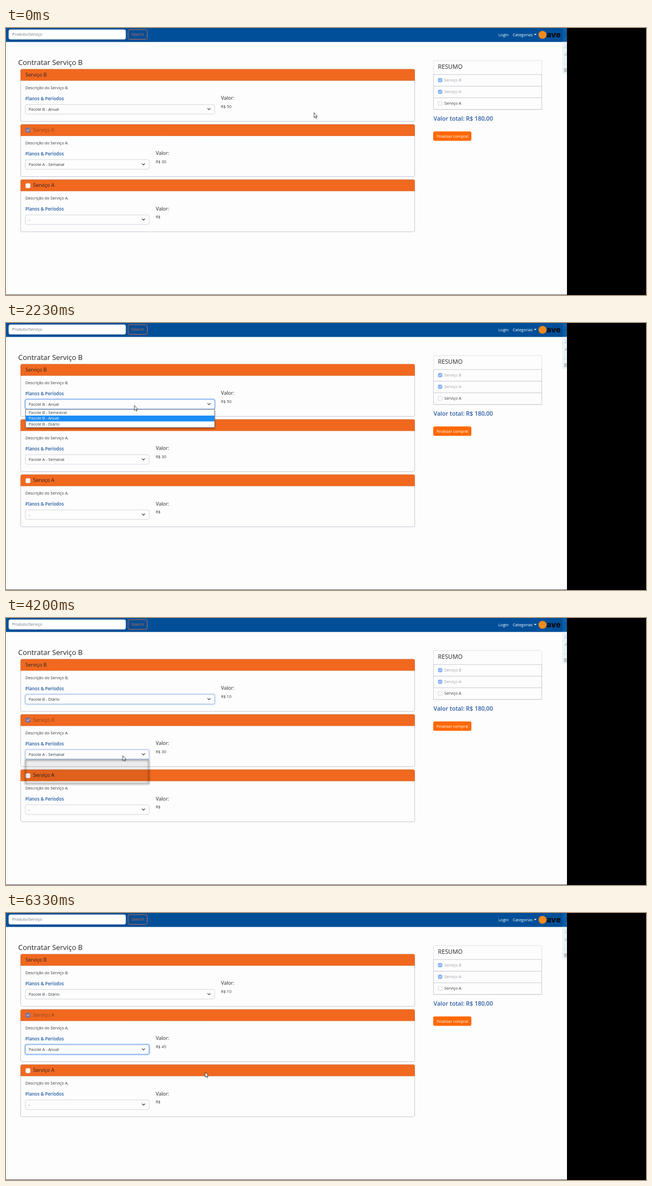
Write an HTML page that moves like this. It is 1158x484 px and loops after 6360 ms.

```html
<!DOCTYPE html>
<html lang="pt-BR">
<head>
<meta charset="utf-8">
<title>Contratar Serviço</title>
<style>
html, body { margin: 0; width: 100%; height: 100%; overflow: hidden; background: #000; }
svg { display: block; width: 1158px; height: 484px; }
text { font: 7.25px "Open Sans", "Noto Sans", sans-serif; fill: #33373c; white-space: pre; }
.title { font-size: 13px; font-weight: 500; fill: #212529; }
.head { font-size: 9.1px; font-weight: 500; fill: #212529; }
.plan { font-size: 8px; font-weight: 600; fill: #1f5a9f; }
.sum { font-size: 10.8px; font-weight: 500; fill: #212529; }
.total { font-size: 10.6px; font-weight: 600; fill: #2a5ca6; }
.muted { fill: #9b9fa4; }
.white { fill: #fff; }
.brand { font: 800 14.5px Inter, sans-serif; fill: #0b0b10; }
</style>
</head>
<body>
<svg id="stage" viewBox="0 0 1158 484"></svg>
<script>
const LOOP = 6360;
const ORANGE = '#f1681f';
const css = [];
const pct = t => (t / LOOP * 100).toFixed(3) + '%';

// Registers keyframes and returns the matching style attribute.
function anim(frames, easing) {
  const name = 'k' + css.length;
  css.push(`@keyframes ${name}{${frames}}`);
  return `style="animation:${name} ${LOOP}ms ${easing} infinite"`;
}

// Visible only inside the given [start, end] spans.
function during(...spans) {
  let frames = spans[0][0] > 0 ? '0%{opacity:0}' : '';
  for (const [a, b] of spans) {
    frames += `${pct(a)}{opacity:1}`;
    if (b < LOOP) frames += `${pct(b)}{opacity:0}`;
  }
  const last = spans[spans.length - 1][1] < LOOP ? 0 : 1;
  return anim(frames + `100%{opacity:${last}}`, 'step-end');
}

function fade(on, off) {
  const end = off ? `${pct(off)}{opacity:1}${pct(off + 150)},100%{opacity:0}` : '100%{opacity:1}';
  return anim(`0%,${pct(on)}{opacity:0}${pct(on + 150)}{opacity:1}${end}`, 'ease-in-out');
}

const text = (x, y, s, cls = '', extra = '') => `<text x="${x}" y="${y}" class="${cls}" ${extra}>${s}</text>`;
const rect = (x, y, w, h, fill, extra = '') =>
  `<rect x="${x}" y="${y}" width="${w}" height="${h}" fill="${fill}" ${extra}/>`;
const path = (d, stroke, width = 1) =>
  `<path d="${d}" fill="none" stroke="${stroke}" stroke-width="${width}" stroke-linecap="round" stroke-linejoin="round"/>`;
const swap = (x, y, before, after, t) =>
  text(x, y, before, '', during([0, t])) + text(x, y, after, '', during([t, LOOP]));

function checkbox(x, y, size, fill, border, checked) {
  const u = size / 8;
  return rect(x, y, size, size, fill, `rx="1.8" stroke="${border}" stroke-width=".8"`) +
    (checked ? path(`M${x + 2 * u} ${y + 4.1 * u}l${1.5 * u} ${1.5 * u} ${2.7 * u} ${-3 * u}`, '#fff') : '');
}

function card({ i, name, box, width, valueX, plan, price, ring, at }) {
  const y = 75 + i * 100.1;
  const titleX = i ? 49 : 35;
  const arrow = 35 + width - 12.6;
  const label = (x, dy, v) => at ? swap(x, y + dy, v[0], v[1], at) : text(x, y + dy, v);
  return rect(26.5, y - .2, 713, 94.5, '#fdfdfd', 'rx="2.5" stroke="#c6c8d4"') +
    `<path d="M26.5 ${y + 20.3}v-18q0-2.5 2.5-2.5h708q2.5 0 2.5 2.5v18z" fill="${ORANGE}" stroke="#d66a33" stroke-width=".6"/>` +
    (box || '') +
    text(titleX, y + 12.8, name, 'head', i === 1 ? 'fill-opacity=".5"' : '') +
    text(35, y + 35.8, `Descrição do ${name}.`) +
    text(35, y + 55.8, 'Planos &amp; Períodos', 'plan') +
    text(valueX, y + 55.3, 'Valor:', 'head') +
    label(valueX, 70, price) +
    rect(35, y + 63.6, width, 17.4, '#fdfdfd', 'rx="3" stroke="#ced2da" stroke-width=".9"') +
    (ring ? `<g ${ring}>` +
      rect(34.2, y + 62.8, width + 1.6, 19, 'none', 'rx="3.6" stroke="#0d6efd" stroke-opacity=".27" stroke-width="2.4"') +
      rect(35, y + 63.6, width, 17.4, 'none', 'rx="3" stroke="#80aeea" stroke-width=".9"') + '</g>' : '') +
    label(41, 74.8, plan) +
    path(`M${arrow} ${y + 70.8}l2.4 2.4 2.4-2.4`, '#343a40', 1.1);
}

function popup({ y, width, open, close, items, marks }) {
  const step = 10.6;
  const h = items.length * step + .8;
  const rows = items.map((s, i) => {
    const base = y + 8 + i * step;
    const on = marks[i] ? `<g ${during(...marks[i])}>` +
      rect(36, y + .4 + i * step, width - 1, step, '#1b8cf6') + text(41, base, s, 'white') + '</g>' : '';
    return text(41, base, s) + on;
  }).join('');
  return `<g ${during([open, open + 40])}>` +
      rect(35, y, width, h, '#000', 'fill-opacity=".07"') +
      rect(35, y, width, h, 'none', 'stroke="#000" stroke-opacity=".4" stroke-width="2" filter="url(#soft)"') + '</g>' +
    `<g ${during([open + 40, close])}>` +
      rect(36, y + 2, width, h, '#000', 'fill-opacity=".4" filter="url(#soft)"') +
      rect(35.5, y, width, h, '#fff', 'stroke="#70757c" stroke-width=".9"') + rows + '</g>';
}

function navbar() {
  return rect(0, 0, 1015, 25.3, '#004f98') +
    rect(5, 3, 211.5, 17.5, '#fff', 'rx="3" stroke="#ced4da" stroke-width=".8"') +
    text(11, 14.4, 'Produto/Serviço', '', 'style="fill:#6c757d"') +
    rect(221, 3, 34.5, 17.5, 'none', 'rx="3" stroke="#cf6a42"') +
    text(227, 14.4, 'Search', '', 'style="fill:#e0693a"') +
    text(891, 14.6, 'Login', 'white') + text(917, 14.6, 'Categorias', 'white') +
    '<path d="M955.3 10.8h4.6l-2.3 2.4z" fill="#fff"/>' +
    '<circle cx="970.8" cy="12.4" r="7.2" fill="#f58a1c"/>' +
    text(978, 17, 'ave', 'brand');
}

function summary() {
  const row = (i, name, on) => {
    const y = 94.5 + i * 21.1;
    return rect(773.5, y - 10.2, 196, 21.1, 'none', 'stroke="#c9ccd6" stroke-width=".9"') +
      checkbox(782, y - 3.5, 7, on ? '#86b1f2' : '#fff', on ? '#86b1f2' : '#c4c8ce', on) +
      text(793, y + 2.5, name, on ? 'muted' : '');
  };
  return rect(773.5, 59, 196, 89, '#fdfdfd', 'rx="2" stroke="#dddfe6" stroke-width=".9"') +
    text(781.5, 74, 'RESUMO', 'sum') +
    row(0, 'Serviço B', true) + row(1, 'Serviço A', true) + row(2, 'Serviço A', false) +
    text(773.5, 168, 'Valor total: R$ 180,00', 'total') +
    rect(773, 187.4, 69, 17.2, '#ff6803', 'rx="3"') +
    text(779, 198.7, 'Finalizar compra!', 'white');
}

// Sliver of a toolbar at the page's right edge.
function toolbar() {
  return rect(1007, 0, 8, 25.3, '#0b5ba4') + rect(1006.5, 25.3, 8.5, 58, '#e9f3f9') +
    path('M1011 22l4-5M1011 5h3', '#2f78b8', .9) +
    path('M1011 36l3-5M1012 36h2.5', '#b9c1c7', .9) +
    '<path d="M1010 50l4.5-6v6z" fill="#c3cacf"/>' +
    path('M1010 65h4', '#d3dadf', .9) + rect(1010, 73, 4.5, 7, '#bcc3c6');
}

function cursor() {
  const track = [
    [0, 557, 153], [350, 557, 153], [1250, 285, 139], [1530, 270, 141], [1880, 232, 149],
    [2350, 232, 149], [2900, 228, 178], [3480, 228, 178], [4050, 211, 249],
    [4500, 211, 249], [5150, 199, 275], [5620, 199, 275], [6250, 360, 288], [LOOP, 360, 288]
  ];
  const frames = track.map(([t, x, y]) => `${pct(t)}{transform:translate(${x}px,${y}px)}`).join('');
  return `<g ${anim(frames, 'ease-in-out')}><path d="M.3 .5v9l2-1.8 1.5 3 1.3-.6-1.4-2.9h2.7z" ` +
    'fill="#fff" stroke="#23262b" stroke-width=".8" stroke-linejoin="round"/></g>';
}

const pickB = 3330, openA = 4170, pickA = 5560;

document.getElementById('stage').innerHTML =
  '<defs><filter id="soft" x="-10%" y="-40%" width="120%" height="180%"><feGaussianBlur stdDeviation="1.5"/></filter></defs>' +
  rect(0, 0, 1158, 484, '#000') + rect(0, 0, 1015, 483.2, '#fdfdfd') +
  rect(0, 483.2, 1015, .8, '#6a7078') +
  navbar() + toolbar() +
  text(22, 67, 'Contratar Serviço B', 'title') +
  card({ i: 0, name: 'Serviço B', width: 342.5, valueX: 389, at: pickB, ring: fade(1900, 4130),
    plan: ['Pacote B - Anual', 'Pacote B - Diário'], price: ['R$ 50', 'R$ 10'] }) +
  card({ i: 1, name: 'Serviço A', width: 224, valueX: 271, at: pickA, ring: fade(4130),
    box: checkbox(35.6, 181, 8.2, '#7b72a0', '#7b72a0', true),
    plan: ['Pacote A - Semanal', 'Pacote A - Anual'], price: ['R$ 30', 'R$ 45'] }) +
  card({ i: 2, name: 'Serviço A', width: 224, valueX: 271,
    box: checkbox(35.6, 281.8, 8.2, '#fff', '#e3d5cf', false), plan: '-', price: 'R$' }) +
  summary() +
  popup({ y: 156.8, width: 342, open: 1930, close: pickB,
    items: ['Semestral', 'Anual', 'Diário'].map(s => 'Pacote B - ' + s),
    marks: [[[2550, 2670]], [[1970, 2550], [2670, 2860]], [[2860, pickB]]] }) +
  popup({ y: 257.4, width: 223.5, open: openA, close: pickA,
    items: ['Diário', 'Anual', 'Mensal', 'Semanal'].map(s => 'Pacote A - ' + s),
    marks: [[[4760, 4910]], [[4910, pickA]], null, [[openA + 40, 4760]]] }) +
  cursor();

const sheet = document.createElement('style');
sheet.textContent = css.join('\n');
document.head.append(sheet);
</script>
</body>
</html>
```
